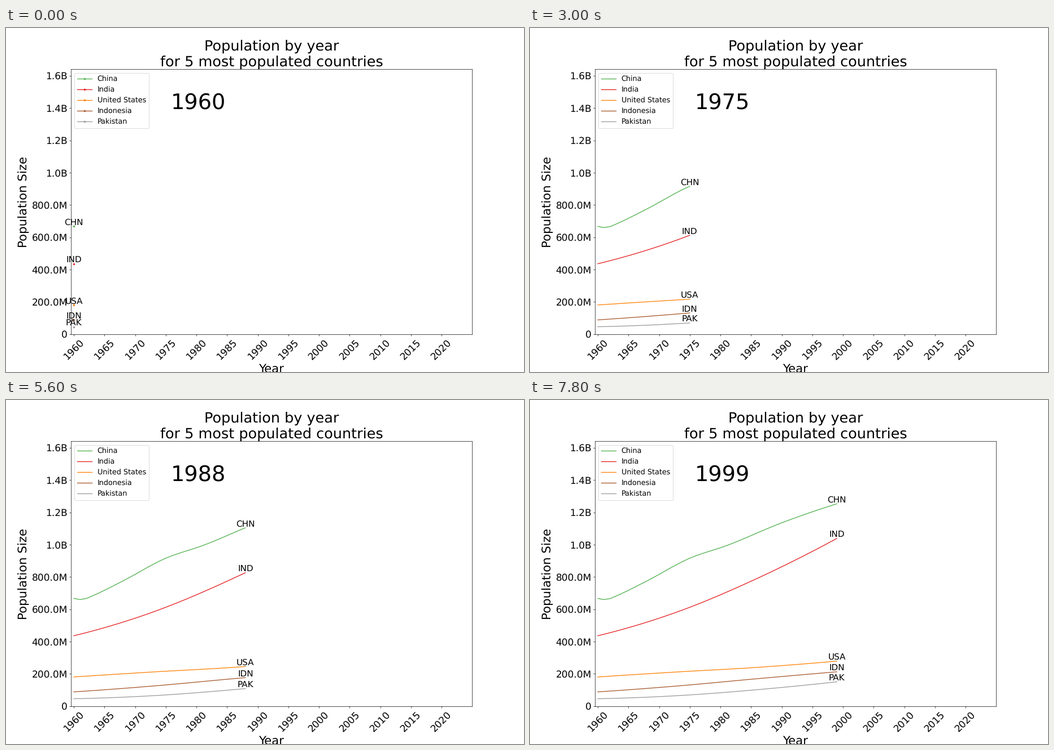
These frames come from a looping animation (917x611 px, 8 s). A matplotlib script:

```python
import numpy as np
import matplotlib.pyplot as plt
from matplotlib.animation import FuncAnimation

W, H, DPI = 917, 611, 61.13
START, FRAMES, STEP_MS = 1960, 40, 200

plt.rcParams["font.family"] = "DejaVu Sans"
plt.rcParams["text.hinting"] = "none"
years = np.arange(START, START + FRAMES)


def curve(values, knots=None):
    """Yearly values on a smooth curve through a few knots (evenly spaced by default)."""
    v = np.array(values, float)
    k = np.linspace(years[0], years[-1], len(v)) if knots is None else np.array(knots, float)
    m = np.gradient(v, k, edge_order=2)
    j = np.clip(np.searchsorted(k, years, "right") - 1, 0, len(k) - 2)
    h = k[j + 1] - k[j]
    s = (years - k[j]) / h
    ease = s * s * (3 - 2 * s)
    bend = s * (1 - s) * ((1 - s) * m[j] - s * m[j + 1])
    return v[j] + (v[j + 1] - v[j]) * ease + h * bend


# Populations in millions
SERIES = [
    ("China", "CHN", "#4daf4a",
     curve([667, 660, 666, 682, 775, 916, 994, 1135, 1253],
           [1960, 1961, 1962, 1963, 1968, 1975, 1981, 1990, 1999])),
    ("India", "IND", "#e41a1c", curve([436, 584, 791, 1038.5])),
    ("United States", "USA", "#ff7f00", curve([180.7, 211.9, 240.1, 279])),
    ("Indonesia", "IDN", "#a65628", curve([88.3, 125, 170, 212.8])),
    ("Pakistan", "PAK", "#999999", curve([46, 65, 102, 150.8])),
]


def short_number(v, _=None):
    if v >= 1000:
        return f"{v / 1000:.1f}B"
    return f"{v:.1f}M" if v else "0"


# The tiny surplus keeps the pixel size from rounding down
fig, ax = plt.subplots(figsize=((W + 1e-3) / DPI, (H + 1e-3) / DPI), dpi=DPI)
fig.subplots_adjust(left=0.125, right=0.9, bottom=0.11, top=0.88)
ax.set_xlim(1959.5, 2025)
ax.set_ylim(0, 1640)
ax.set_xticks(range(1960, 2021, 5))
ax.set_yticks(range(0, 1601, 200))
ax.yaxis.set_major_formatter(short_number)
ax.tick_params(labelsize=20)
ax.tick_params(axis="x", rotation=45)
ax.set_xlabel("Year", fontsize=25)
ax.set_ylabel("Population Size", fontsize=25)
ax.set_title("Population by year\nfor 5 most populated countries", fontsize=30)

lines, tags = [], []
for name, code, color, data in SERIES:
    lines += ax.plot([], [], color=color, label=name)
    tags.append(ax.annotate(code, (START, data[0]), xytext=(0, 3),
                            textcoords="offset points", ha="center",
                            fontsize=18, annotation_clip=False))
legend = ax.legend(loc="upper left", fontsize=15)
counter = ax.text(0.25, 0.85, "", transform=ax.transAxes, fontsize=45)


def draw(i):
    marker = "." if i == 0 else "None"
    for line, key, tag, (*_, data) in zip(lines, legend.get_lines(), tags, SERIES):
        line.set_data(years[:i + 1], data[:i + 1])
        line.set_marker(marker)
        key.set_marker(marker)
        tag.xy = (years[i], data[i])
    counter.set_text(str(years[i]))
    return [*lines, *tags, legend, counter]


anim = FuncAnimation(fig, draw, frames=FRAMES, interval=STEP_MS,
                     init_func=lambda: draw(0), repeat=True, repeat_delay=0)
plt.show()
```
